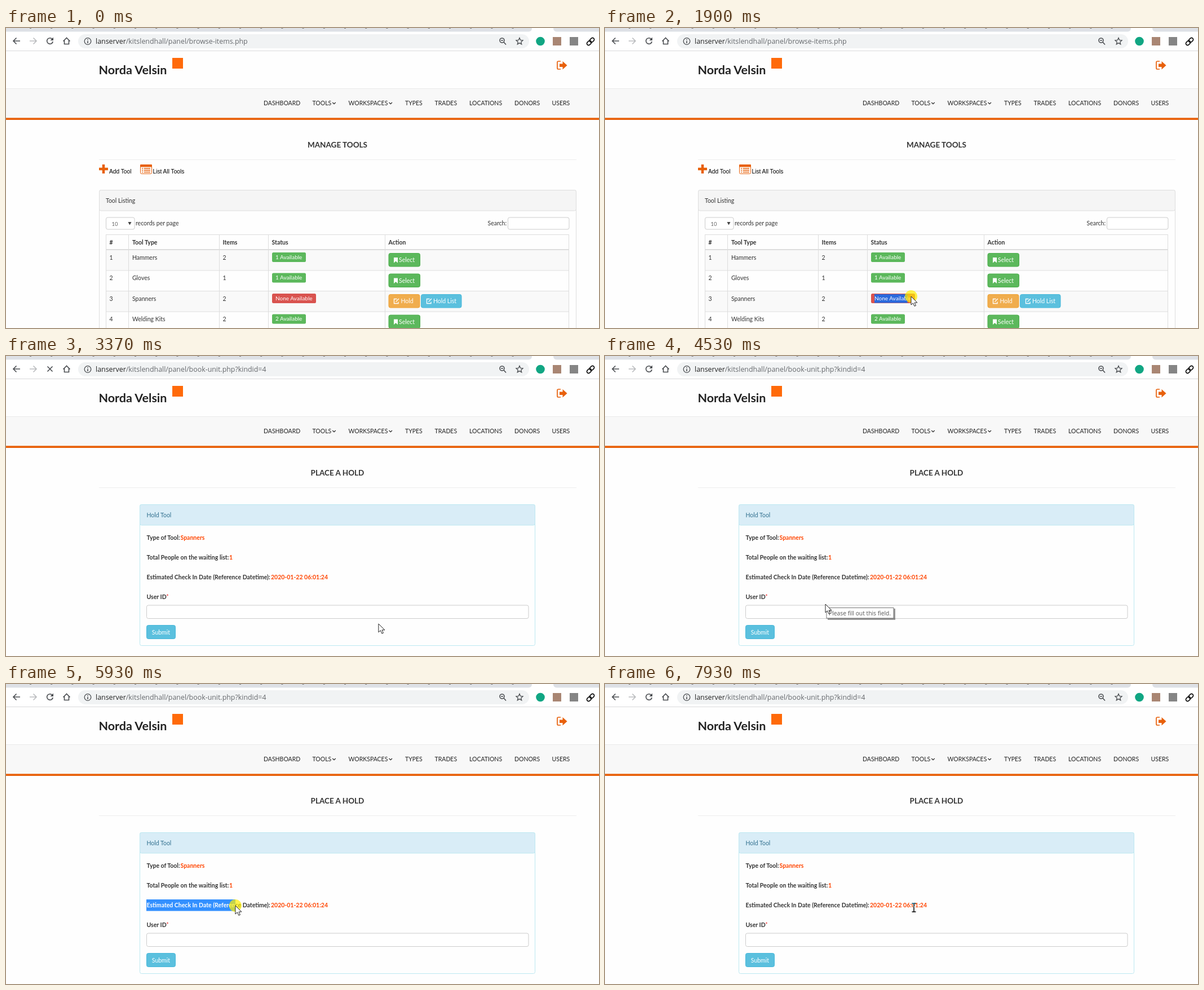
Write an HTML page that moves like this. It is 1052 by 532 pixels and loops after 8000 ms.

```html
<!DOCTYPE html>
<html lang="en">
<head>
<meta charset="utf-8">
<title>Tool hold walkthrough</title>
<style>
  html, body { margin: 0; width: 100%; height: 100%; overflow: hidden; background: #fefefe; }
  svg { display: block; width: 1052px; height: 532px; font: 10.5px Lato, sans-serif; fill: #333; }
  text { white-space: pre; }
  .b { font-weight: 700; }
  .w { fill: #fff; }
  .nav { fill: #222; }
  .hot { fill: #ff4500; font-weight: 700; }
  .ui { font-family: "Open Sans", "Noto Sans", sans-serif; }
  .arial { font: 10.2px "Liberation Sans", Arial, sans-serif; fill: #000; }
  .line { fill: none; stroke: #4a4d51; stroke-width: 1.6; }
  .ink { fill: none; stroke: #fff; stroke-width: 1.3; }
  #ibeam { mix-blend-mode: difference; }
</style>
</head>
<body>
<svg id="stage" viewBox="0 0 1052 532"></svg>
<script>
const ORANGE = '#e8600a';
const text = (x, y, s, attrs = '') => `<text x="${x}" y="${y}" ${attrs}>${s}</text>`;
const rect = (x, y, w, h, fill, attrs = '') =>
  `<rect x="${x}" y="${y}" width="${w}" height="${h}" fill="${fill}" ${attrs}/>`;
const box = (x, y, w, h, fill, stroke, r = 3) =>
  rect(x + .5, y + .5, w - 1, h - 1, fill, `stroke="${stroke}" rx="${r}"`);
const path = (d, attrs = 'class="line"') => `<path d="${d}" ${attrs}/>`;
const group = (id, body, attrs = '') => `<g id="${id}" ${attrs}>${body}</g>`;
const clip = id => `<clipPath id="${id}Clip"><rect id="${id}Area" height="532"/></clipPath>`;

function browserBar() {
  return rect(0, 0, 1052, 41, '#fff') +
    path('M0 0H933Q933 6 927 6.5H0ZM971 0H1052V6.5H977Q971 6 971 0Z', 'fill="#dee1e6"') +
    path('M42 .5H905', 'stroke="#777" stroke-dasharray="3 34.2"') +
    rect(0, 40, 1052, 1, '#d9dadc') +
    rect(128, 11, 800, 25, '#f1f3f4', 'rx="12.5"') +
    path('M25 23H13M18.500 17.500L13 23l5.500 5.500') +
    path('M42 23H54M48.500 17.500L54 23l-5.500 5.500', 'class="line" style="stroke:#babcbe"') +
    group('reload', path('M82 19.500A5.300 5.300 0 1 0 83.200 24') +
      path('M84 16.500V22H78.500Z', 'fill="#4a4d51"')) +
    group('stop', path('M73.500 18.500l9 9m0-9l-9 9')) +
    path('M101.500 23.500L107.500 17.500l6 6M103.500 22V28.500H111.500V22') +
    '<circle cx="145" cy="23.500" r="5.800" class="line" style="stroke-width:1.300"/>' +
    path('M145 20v1.500M145 23v4') +
    '<circle cx="880" cy="22" r="4" class="line"/>' + path('M883 25l4 4.500M878 22h4') +
    path('M911 17.500l1.700 4 4.300.400-3.300 2.800 1 4.200-3.700-2.300-3.700 2.300 1-4.200-3.300-2.800 4.300-.400Z',
      'class="line" style="stroke-width:1.300"') +
    '<circle cx="948" cy="23.500" r="7.800" fill="#11a683"/>' +
    rect(970, 16, 15, 15, '#a98673') + rect(1000, 16, 15, 15, '#858585') +
    group('link', '<rect x="-8" y="-3" width="9" height="6" rx="3"/><rect x="-1" y="-3" width="9" height="6" rx="3"/>',
      'transform="translate(1037 24) rotate(-45)" fill="none" stroke="#111" stroke-width="1.700"');
}

function siteHeader() {
  const items = [[457, 'DASHBOARD'], [543.5, 'TOOLS'], [607.5, 'WORKSPACES'], [708, 'TYPES'],
    [760.5, 'TRADES'], [822, 'LOCATIONS'], [902, 'DONORS'], [968.5, 'USERS']];
  return text(164.5, 82, 'Norda Velsin', 'class="b" font-size="21.500" style="fill:#222"') +
    rect(295, 53, 19, 19, '#ff6a0a') +
    path('M984 59H980Q978 59 978 61V71Q978 73 980 73H984', `fill="none" stroke="${ORANGE}" stroke-width="1.700"`) +
    path('M982 63.500H987.500V59L995.500 66.200 987.500 73.500V69H982Z', `fill="${ORANGE}"`) +
    rect(0, 107, 1052, 52, '#f8f8f8') + rect(0, 107, 1052, 1, '#e9e9e9') +
    rect(0, 159.3, 1052, 3.7, ORANGE) +
    items.map(([x, s]) => text(x, 137, s, 'class="nav"')).join('') +
    [582, 682.3].map(x => path(`M${x - 2.7} 132l2.700 2.700 2.700-2.700`,
      'fill="none" stroke="#222" stroke-width="1.100"')).join('') +
    rect(165, 233, 847, 1, '#eee');
}

const title = s => text(588, 211.5, s, 'class="b" font-size="13.500" text-anchor="middle"');
const address = rest => text(159, 28, `<tspan fill="#222">lanserver</tspan>/kitslendhall/panel/${rest}`,
  'class="ui" font-size="12.400" fill="#66696d"');
const pill = (x, y, w, s, fill) => rect(x, y, w, 17, fill, 'rx="2.500"') +
  text(x + 6, y + 11.8, s, 'class="w" font-size="10"');
const editIcon = x => path(`M${x + 6} 480.500H${x + 1}V488.500H${x + 8.500}V485.500M${x + 4} 485.500l5.500-5.500`, 'class="ink"');

function toolRow([name, count, status, ok], i) {
  const y = 393 + 36.5 * i;
  const select = box(678.5, y + 6, 56.5, 24.5, '#5cb85c', '#4cae4c') +
    path(`M688 ${y + 14}h7v9.500l-3.500-3-3.500 3Z`, 'fill="#fff"') +
    text(697, y + 22, 'Select', 'class="w"');
  const hold = group('hold', box(678.5, 472, 56, 24.5, 'inherit', 'inherit')) + editIcon(687.5) +
    text(700.5, 488, 'Hold', 'class="w"') +
    group('list', box(736, 472, 72.5, 24.5, 'inherit', 'inherit')) + editIcon(745.5) +
    text(758, 488, 'Hold List', 'class="w"');
  return rect(177, y, 821, 36.5, i % 2 ? '#fefefe' : '#f9f9f9') + rect(177, y, 822, 1, '#ddd') +
    text(183.5, y + 17.5, i + 1) + text(224, y + 17.5, name) + text(384.5, y + 17.5, count) +
    pill(472, y + 5, ok ? 60 : 78, status, ok ? '#5cb85c' : '#d9534f') + (ok ? select : hold);
}

function listPage() {
  const rows = [['Hammers', 2, '1 Available', 1], ['Gloves', 1, '1 Available', 1],
    ['Spanners', 2, 'None Available', 0], ['Welding Kits', 2, '2 Available', 1]];
  const heads = [[183.5, '#'], [224, 'Tool Type'], [384.5, 'Items'], [471.5, 'Status'], [678.5, 'Action']];
  return address('browse-items.php') + title('MANAGE TOOLS') +
    path('M173 242V258M165 250H181', `stroke="${ORANGE}" stroke-width="4.500"`) +
    text(183, 258, 'Add Tool', 'class="arial"') +
    box(238, 242, 21, 17, 'none', ORANGE, 2) + rect(238, 242, 21, 4.5, ORANGE, 'rx="1"') +
    path('M241 249H243M244.500 249H256M241 252.200H243M244.500 252.200H256M241 255.400H243M244.500 255.400H256',
      `stroke="${ORANGE}" stroke-width="1.500"`) +
    text(260.5, 258, 'List All Tools', 'class="arial"') +
    box(165, 287, 847, 260, '#fefefe', '#ddd') + box(165, 287, 847, 37.5, '#f5f5f5', '#ddd') +
    text(177, 309.5, 'Tool Listing') +
    box(177, 335.5, 51.5, 22, '#fff', '#ccc') + text(187.5, 351, '10', 'font-size="9.500" fill="#666"') +
    path('M216.500 344h6l-3 5.500Z', 'fill="#444"') +
    text(230, 349.5, 'records per page') + text(854.5, 349.5, 'Search:') +
    box(890, 335.5, 109.5, 22, '#fff', '#ccc') +
    rect(177, 366, 822, 1, '#ddd') + heads.map(([x, s]) => text(x, 383.5, s, 'class="b"')).join('') +
    rows.map(toolRow).join('') + rect(177, 392, 822, 1.5, '#ddd') +
    [177, 217, 378, 465, 672, 998].map(x => rect(x, 366, 1, 166, '#ddd')).join('') +
    group('labelSel', rect(478, 472, 60, 15.5, '#2b69dc') +
      text(478, 482.8, 'None Available', 'class="w" font-size="10"'), 'clip-path="url(#labelSelClip)"');
}

function holdPage() {
  const estimate = 'Estimated Check In Date (Reference Datetime):', date = '2020-01-22 06:01:24';
  return address('book-unit.php?kindid=4') + title('PLACE A HOLD') +
    box(237, 263, 702, 251, '#fefefe', '#bce8f1') + box(237, 263, 702, 37.5, '#d9edf7', '#bce8f1') +
    text(249.5, 285.5, 'Hold Tool', 'fill="#31708f"') +
    text(249.5, 325.5, 'Type of Tool:', 'class="b"') + text(309.5, 325.5, 'Spanners', 'class="hot"') +
    text(249.5, 360.8, 'Total People on the waiting list:', 'class="b"') + text(396, 360.8, '1', 'class="hot"') +
    text(249.5, 396, estimate, 'class="b"') + text(470, 396, date, 'class="hot"') +
    text(249.5, 431, 'User ID', 'class="b"') + text(284.3, 431, '*', 'fill="#e33"') +
    box(249, 441.5, 678.5, 24.5, '#fff', '#ccc') +
    box(249, 477, 52, 25, '#5bc0de', '#46b8da') + text(258.8, 493.5, 'Submit', 'class="w"') +
    group('dateSel', rect(249, 382, 219, 20.5, '#3390ff') + rect(468, 382, 102, 24, '#3390ff') +
      text(249.5, 396, estimate, 'class="b w"') + text(470, 396, date, 'class="b w"'),
      'clip-path="url(#dateSelClip)"') +
    group('tip', rect(395, 448, 120, 20, '#0006') + box(392.5, 446, 120, 19.5, '#fff', '#767676', 0) +
      text(397, 459.5, 'Please fill out this field.', 'class="ui" font-size="10.300" fill="#575757"'));
}

function pointers() {
  return '<circle id="halo" r="11" fill="#ffee00" opacity=".7"/>' +
    group('arrow', path('M0 0V15L3.500 11.800 6 17.300 8.500 16.200 6.100 11H11Z', 'fill="#fff" stroke="#222"')) +
    group('hand', path('M-1.500 8V0Q0-2 1.500 0V6L6 7Q8 7.500 8 9.500L7 14V17H-1.500L-5 11.500Q-6 8.500-3.500 9.500L-1.500 11Z',
      'fill="#fff" stroke="#222"')) +
    group('ibeam', path('M-3.500-7H3.500M-3.500 8H3.500M0-7V8', 'stroke="#fff" stroke-width="1.500"'));
}

const stage = document.getElementById('stage');
stage.innerHTML = `<defs>${clip('labelSel')}${clip('dateSel')}</defs>` + rect(0, 0, 1052, 532, '#fefefe') +
  browserBar() + siteHeader() + group('listPage', listPage()) + group('holdPage', holdPage()) + pointers();

const el = id => document.getElementById(id);
const show = (id, on) => { el(id).style.display = on ? '' : 'none'; };
const within = (v, a, b) => v >= a && v < b;

// Pointer stops: time, x, y
const stops = [[200, 192, 526], [600, 700, 486], [970, 500, 485], [1200, 481, 475], [1430, 480, 475],
  [1820, 543, 476], [2200, 543, 476], [2360, 814, 486], [2500, 814, 486], [2660, 731, 484],
  [3260, 731, 484], [3620, 391, 440], [4600, 391, 440], [5000, 251, 392], [5300, 251, 392],
  [5920, 407, 393], [6080, 428, 396], [6150, 428, 396], [6920, 612, 404], [7300, 612, 404],
  [7390, 614, 408], [7500, 614, 408], [7860, 548, 396], [8000, 548, 396]];
const presses = [[1430, 1899], [2980, 3130], [5460, 6940], [7300, 7460]];

function pointerAt(t) {
  const i = Math.max(1, stops.findIndex(s => s[0] > t));
  const [t0, x0, y0] = stops[i - 1], [t1, x1, y1] = stops[i];
  const p = Math.max(0, (t - t0) / (t1 - t0)), e = p * p * (3 - 2 * p);
  return [x0 + (x1 - x0) * e, y0 + (y1 - y0) * e];
}

function select(id, on, from, to) {
  show(id, on);
  el(id + 'Area').setAttribute('x', from);
  el(id + 'Area').setAttribute('width', Math.max(0, to - from));
}

function paint(el, over, normal, hover) {
  const [fill, stroke] = over ? hover : normal;
  el.firstChild.setAttribute('fill', fill);
  el.firstChild.setAttribute('stroke', stroke);
}

const STEP = 77.2;
function draw() {
  const now = performance.now() % 8000;
  const t = now < 200 ? 0 : 200 + STEP * Math.floor((now - 199) / STEP);
  const [x, y] = pointerAt(t);
  const onList = t < 3290, visible = t >= 200;
  const pressed = presses.some(([a, b]) => within(t, a, b));
  const onButtons = visible && onList && within(y, 472, 497);
  const overHold = onButtons && within(x, 679, 735), overList = onButtons && within(x, 736, 809);
  const overText = !pressed && (onList ? within(x, 474, 549) && within(y, 470, 489)
    : within(x, 248, 571) && within(y, 384, 403));
  const shape = overHold || overList ? 'hand' : overText ? 'ibeam' : 'arrow';

  show('listPage', onList);
  show('holdPage', !onList);
  show('stop', within(t, 3050, 3500));
  show('reload', !within(t, 3050, 3500));
  show('tip', within(t, 3900, 4640));
  paint(el('hold'), overHold, ['#f0ad4e', '#eea236'], ['#ec971f', '#d58512']);
  paint(el('list'), overList, ['#5bc0de', '#46b8da'], ['#31b0d5', '#269abc']);
  select('labelSel', within(t, 1430, 3290), 478, t > 1890 ? 536.5 : Math.min(x, 536.5));
  select('dateSel', within(t, 5300, 7380), 249, Math.min(x, 570));
  for (const id of ['arrow', 'hand', 'ibeam', 'halo']) {
    show(id, visible && (id === 'halo' ? pressed : id === shape));
    el(id).setAttribute('transform', `translate(${x.toFixed(1)} ${y.toFixed(1)})`);
  }
  requestAnimationFrame(draw);
}
draw();
</script>
</body>
</html>
```
